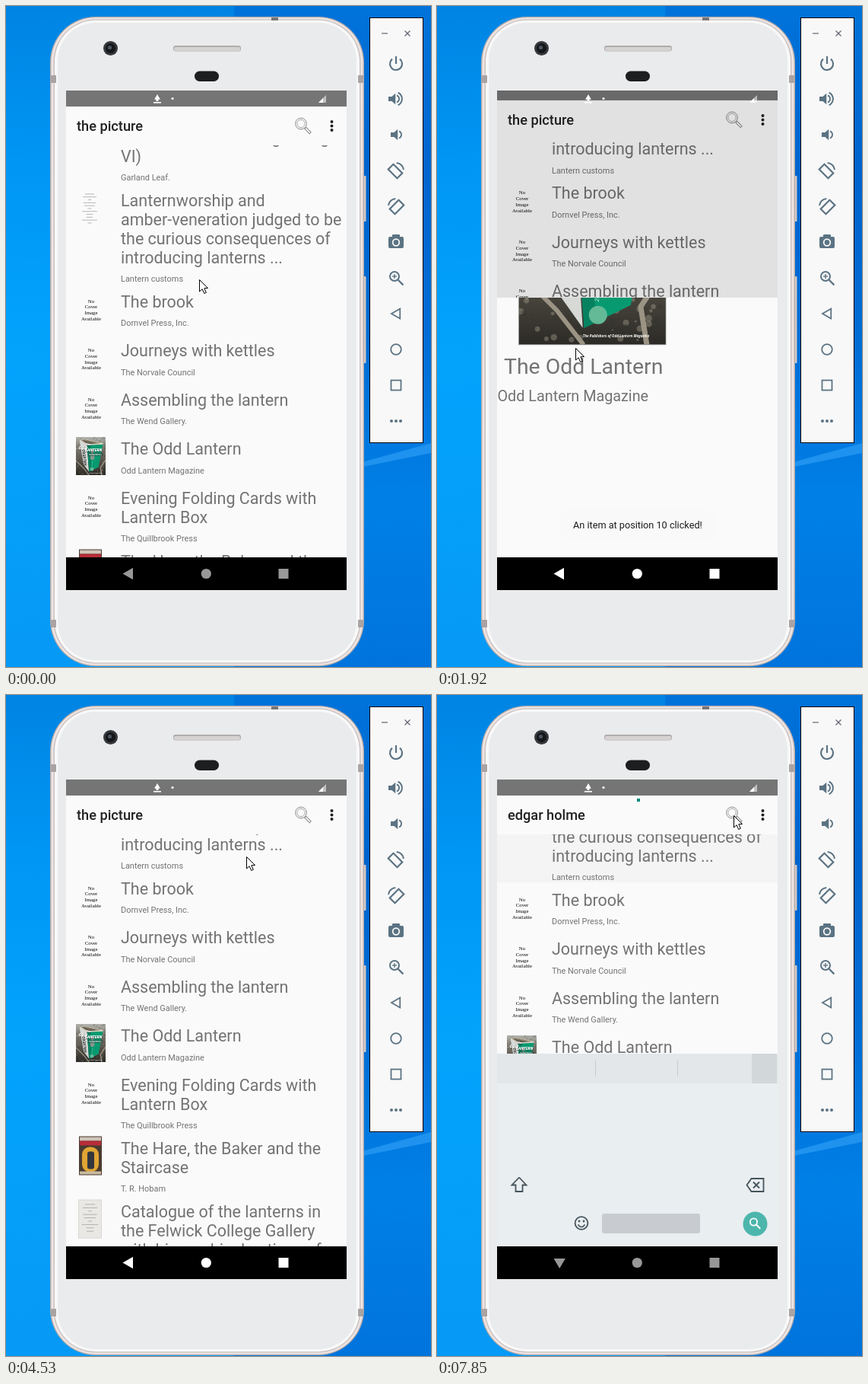
These frames come from a looping animation (559x868 px, 8 s). An HTML page with a canvas:

```html
<!DOCTYPE html>
<html lang="en">
<head>
<meta charset="utf-8">
<title>Book list app</title>
<style>
html, body { margin: 0; width: 100%; height: 100%; overflow: hidden; }
canvas { display: block; width: 559px; height: 868px; }
</style>
</head>
<body>
<canvas id="stage" width="559" height="868"></canvas>
<script>
const g = document.getElementById('stage').getContext('2d');
const LOOP = 8000;
const BURSTS = [[120, 940, 6], [1400, 1640, 2], [1790, 2070, 2], [2630, 3650, 7],
  [3800, 4220, 3], [4530, 5600, 8], [5890, 7150, 9], [7460, 7850, 3]];
const POINTER = [[120, 254, 359], [940, 182, 449], [2070, 182, 449], [2630, 170, 543],
  [3360, 160, 743], [4220, 160, 743], [4530, 316, 212], [4820, 390, 158]];
const GREY = '#737373', INK = '#212121', PAPER = '#fafafa', SLATE = '#5b7383', TEAL = '#00897b';
const SANS = 'Open Sans, sans-serif';
const BOOK = 'The Odd Lantern', MAKER = 'Odd Lantern Magazine', QUERY = 'edgar holme';

const items = [
  { lines: ['Tales of a hidden stage song', 'VI)'], by: 'Garland Leaf.' },
  { lines: ['Lanternworship and', 'amber-veneration judged to be', 'the curious consequences of', 'introducing lanterns ...'], by: 'Lantern customs', art: leaflet },
  { lines: ['The brook'], by: 'Dornvel Press, Inc.', art: noCover },
  { lines: ['Journeys with kettles'], by: 'The Norvale Council', art: noCover },
  { lines: ['Assembling the lantern'], by: 'The Wend Gallery.', art: noCover },
  { lines: [BOOK], by: MAKER, art: y => cover(92, y - 23, 39, 50) },
  { lines: ['Evening Folding Cards with', 'Lantern Box'], by: 'The Quillbrook Press', art: noCover },
  { lines: ['The Hare, the Baker and the', 'Staircase'], by: 'T. R. Hobam', art: novel },
  { lines: ['Catalogue of the lanterns in', 'the Felwick College Gallery', 'with biographical notices of'], by: 'Unknown', art: oldPage }
];
let rowY = 179.5;
for (const it of items) {
  it.y = rowY;
  rowY += Math.max(64.5, 33 + 25 * it.lines.length);
}

const ramp = (t, a, b) => Math.min(1, Math.max(0, (t - a) / (b - a)));
const mix = (a, b, k) => a + (b - a) * k;
const easeOut = k => 1 - (1 - k) ** 2;

function box(x, y, w, h, c) { g.fillStyle = c; g.fillRect(x, y, w, h); }
function frameBox(x, y, w, h, c, lw) { g.strokeStyle = c; g.lineWidth = lw; g.strokeRect(x, y, w, h); }
function rbox(x, y, w, h, r, c) { g.beginPath(); g.roundRect(x, y, w, h, r); g.fillStyle = c; g.fill(); }
function disc(x, y, r, c) { g.beginPath(); g.arc(x, y, r, 0, 7); g.fillStyle = c; g.fill(); }
function arc(x, y, r, a, b, c, lw) { g.beginPath(); g.arc(x, y, r, a, b); g.strokeStyle = c; g.lineWidth = lw; g.stroke(); }
function ring(x, y, r, c, lw) { arc(x, y, r, 0, 7, c, lw); }
function trace(p, close) {
  g.beginPath();
  for (let i = 0; i < p.length; i += 2) g.lineTo(p[i], p[i + 1]);
  if (close) g.closePath();
}
function poly(p, c) { trace(p, true); g.fillStyle = c; g.fill(); }
function line(p, c, lw, close) { trace(p, close); g.strokeStyle = c; g.lineWidth = lw; g.stroke(); }
// Corners of an equilateral triangle pointing towards angle a.
function tri(x, y, r, a) {
  return [0, 1, 2].flatMap(i => [x + r * Math.cos(a + i * 2.0944), y + r * Math.sin(a + i * 2.0944)]);
}
function cross(x, y, r, c, lw) {
  line([x - r, y - r, x + r, y + r], c, lw);
  line([x + r, y - r, x - r, y + r], c, lw);
}
function glass(x, y, r, c, lw) {
  ring(x, y, r, c, lw);
  line([x + r * 0.75, y + r * 0.75, x + r * 1.9, y + r * 1.9], c, lw * 1.15);
}
function text(s, x, y, size, c, style = '', family = 'Roboto, sans-serif') {
  g.font = `${style} ${size}px ${family}`;
  g.fillStyle = c;
  g.fillText(s, x, y);
}
function at(x, y, fn, angle = 0) { g.save(); g.translate(x, y); g.rotate(angle); fn(); g.restore(); }
function clip(x, y, w, h, fn) {
  g.save(); g.beginPath(); g.rect(x, y, w, h); g.clip(); fn(); g.restore();
}
function fade(a, fn) { g.save(); g.globalAlpha = a; fn(); g.restore(); }
function gradient(y0, y1, ...cs) {
  const f = g.createLinearGradient(0, y0, 0, y1);
  cs.forEach((c, i) => f.addColorStop(i / (cs.length - 1), c));
  return f;
}

function desktop() {
  box(0, 0, 300, 868, gradient(0, 868, '#0084e3', '#0097f4', '#02a2fb', '#049ff9', '#0699f5'));
  box(300, 0, 259, 868, gradient(0, 868, '#0073da', '#0064ce', '#006cd6', '#0080e6', '#0074dc'));
  poly([465, 600, 559, 574, 559, 587, 465, 606], 'rgba(70,175,255,.45)');
}

function phone() {
  for (const [y, h] of [[223, 60], [355, 114]]) rbox(470, y, 3.5, h, 1, '#d2c7c5');
  const shell = ['#b9aeac', '#eee5e3', '#c9c1c0', '#f8f8f9', '#e9ebed'];
  [0, 1.5, 4.5, 6, 10].forEach((d, i) => rbox(58 + d, 14 + d * 0.8, 413 - 2 * d, 853 - 1.6 * d, 60 - d, shell[i]));
  box(349, 15, 9, 4, '#77757a');
  for (const y of [91, 806]) for (const x of [59, 463]) box(x, y, 7, 10, '#aaa3a3');
  disc(137.5, 55.5, 9.5, '#35373b');
  disc(137.5, 55.5, 6.5, '#15171b');
  disc(136.5, 54.5, 2.6, '#4b5562');
  rbox(220, 52, 89, 7.5, 3, '#b1adad');
  rbox(221, 54, 87, 5, 2, '#d6d2d1');
  rbox(248, 85.5, 32, 13.5, 6.7, '#1d1e20');
}

function speaker(x, y, waves) {
  box(x - 7, y - 3, 5, 6, SLATE);
  poly(tri(x - 2, y, 8.5, Math.PI).map((v, i) => i === 0 ? x - 6 : v), SLATE);
  for (let i = 1; i <= waves; i++) arc(x + 2, y, 1 + i * 4, -1.15, 1.15, SLATE, 2);
}
function rotateIcon(y, dir) {
  at(513, y, () => {
    g.scale(dir, 1);
    at(-1, 1, () => frameBox(-4.8, -8.3, 9.6, 16.6, SLATE, 2.2), -Math.PI / 4);
    arc(0, 0, 10, -1.5, -0.1, SLATE, 2);
  });
}
function sidebar() {
  box(478, 15, 71, 559, '#000');
  box(479, 16, 69, 557, '#f8f8f8');
  line([494, 36, 502, 36], '#667', 1.2);
  cross(528, 36, 3.5, '#667', 1.2);
  arc(513, 76, 8, -0.9, Math.PI + 0.9, SLATE, 2.2);
  line([513, 66, 513, 76], SLATE, 2.2);
  speaker(510, 122, 2);
  speaker(513, 169, 1);
  rotateIcon(216, 1);
  rotateIcon(263, -1);
  rbox(503, 303, 20, 15, 2, SLATE);
  rbox(508, 300, 10, 6, 1, SLATE);
  ring(513, 310.5, 4.3, '#f8f8f8', 1.8);
  glass(511, 355, 6, SLATE, 2);
  at(511, 355, () => cross(0, 0, 2.1, SLATE, 1.4), Math.PI / 4);
  line(tri(514.5, 404, 7.5, Math.PI), SLATE, 1.8, true);
  ring(513, 451, 6.8, SLATE, 1.8);
  frameBox(506.5, 491.5, 13, 13, SLATE, 1.8);
  for (let x = 507; x < 520; x += 6) disc(x, 545, 2, SLATE);
}

function noCover(y) {
  g.textAlign = 'center';
  'No Cover Image Available'.split(' ').forEach((s, i) =>
    text(s, 112, y - 6 + i * 7.8, 6.8, '#000', '', 'Liberation Serif, serif'));
  g.textAlign = 'left';
}
// Rows of unreadable print, centred on x.
function print(x, y, rows, gap, width, c) {
  for (let i = 0; i < rows; i++) {
    const w = width * (0.6 + 0.4 * Math.sin(i * 2.3));
    box(x - w / 2, y + i * gap, w, 0.9, c);
  }
}
function leaflet(y) { print(110, y - 16, 11, 3.8, 20, '#b0b0b0'); }
function oldPage(y) {
  box(95, y - 23, 31, 51, '#d8d7d3');
  box(96, y - 22, 29, 49, '#e9e8e4');
  print(110.5, y - 17, 9, 4.4, 22, '#adaca8');
}
function novel(y) {
  box(96, y - 23, 30, 51, '#493b30');
  box(97, y - 22, 28, 5, '#cfc4b8');
  box(97, y - 17, 28, 6, '#b62d38');
  rbox(100, y - 9, 22, 33, 10, '#e0a534');
  rbox(107, y - 3, 9, 23, 3, '#33363d');
  box(97, y + 23, 28, 4, '#c9b9a0');
}

// Book cover on a 193 x 250 grid: a tower block seen from the air.
function cover(x, y, w, h) {
  g.save();
  g.translate(x, y);
  g.scale(w / 193, h / 250);
  g.beginPath(); g.rect(0, 0, 193, 250); g.clip();
  box(0, 0, 193, 250, gradient(0, 250, '#b4b5b0', '#7e7b70', '#67625a', '#48453d', '#2c2a26'));
  let seed = 7;
  const rnd = () => (seed = seed * 16807 % 2147483647) / 2147483647;
  for (let i = 0; i < 260; i++) {
    const px = rnd() * 193, py = rnd() * 250;
    fade(0.4, () => disc(px, py, 1 + rnd() * 3.5, rnd() < 0.65 ? '#33352e' : '#a8a292'));
  }
  line([0, 155, 50, 205, 85, 250], '#9b9383', 6);
  line([193, 150, 160, 200, 168, 250], '#9b9383', 7);
  poly([23, 20, 72, 50, 84, 228, 50, 180], '#d6d9d6');
  poly([72, 50, 176, 45, 147, 198, 86, 228], '#079a70');
  poly([72, 50, 95, 49, 101, 221, 86, 228], '#068260');
  poly([23, 20, 55, 13, 176, 40, 176, 49, 74, 54], '#d9d2c1');
  poly([34, 20, 57, 16, 160, 40, 77, 47], '#665f50');
  for (let i = 0; i < 11; i++) line([44 + i * 10, 21 + i * 2, 54 + i * 10, 18 + i * 2.2], '#c0b296', 3);
  at(70, 187, () => text('HALVEXO', 0, 0, 25, '#2d312f', 'italic 700', SANS), -1.68);
  for (let i = 0; i < 2; i++) {
    g.beginPath(); g.ellipse(107, 92 + i * 40, 11 + i * 3, 15 + i * 4, 0.1, 0, 7);
    g.fillStyle = '#84968d'; g.fill();
  }
  disc(104, 211, 12, '#64b997');
  at(105, 194, () => text('24 novalin', 0, 0, 8, '#c9e8dc', 'italic'), -1.42);
  fade(0.55, () => box(80, 105, 96, 20, '#24483c'));
  const bold = (s, px, py, size) => {
    text(s, px + 1.5, py + 1.5, size, 'rgba(0,0,0,.55)', 'italic 800', SANS);
    text(s, px, py, size, '#fff', 'italic 800', SANS);
  };
  box(0, 78, 62, 1.2, '#fff');
  bold('The', 65, 56, 18);
  bold('ODD', 17, 78, 28);
  bold('LANTERN', 61, 97, 24);
  const small = (s, py, size) => text(s, 84, py, size, '#fff', 'italic 700', SANS);
  small('The Craft & Trimming of', 113, 6.7);
  small('Large-Format Paper Lights', 121, 6.7);
  small('The Publishers of ' + MAKER, 240, 4.6);
  g.restore();
}

function statusIcons() {
  poly(tri(199, 120.5, 4.5, -Math.PI / 2), '#fff');
  box(197.5, 121, 3, 4, '#fff');
  box(194, 126, 10, 1.6, '#fff');
  disc(219, 121.5, 1.6, '#fff');
  poly([421, 117, 421, 127, 411, 127], 'rgba(255,255,255,.55)');
  poly([417, 121, 417, 127, 411, 127], '#fff');
}
function menuDots() { for (let y = 152; y < 164; y += 5.5) disc(428.5, y, 2, INK); }
function lens() {
  ring(388, 154.5, 7.4, '#8b8b8b', 1);
  ring(388, 154.5, 5.2, '#9c9c9c', 0.9);
  at(397, 163.5, () => frameBox(-4.5, -1.4, 9, 2.8, '#8b8b8b', 1), Math.PI / 4);
}

function listScreen(s) {
  box(79, 132, 369, 592, PAPER);
  clip(79, 183, 369, 541, () => {
    if (s.loading) box(79, 183, 369, 63, '#f4f4f4');
    for (const it of items) {
      const y = it.y - s.scroll, last = y + (it.lines.length - 1) * 25;
      if (it.art) it.art(y);
      it.lines.forEach((l, i) => text(l, 151, y + i * 25, 21.5, GREY));
      text(it.by, 151, last + 24.5, 10.95, GREY);
    }
  });
  if (s.search) {
    box(92, 146, 309, 23, '#f5f5f5');
    line([111, 157.5, 98, 157.5], INK, 1.9);
    line([104, 151, 97.5, 157.5, 104, 164], INK, 1.9);
    text(s.typed || 'Search…', 144, 164, 16, s.typed ? INK : '#8a8a8a');
    box(143.5 + (s.typed && g.measureText(s.typed).width), 147, 1.6, 21, TEAL);
  } else {
    text(s.title, 93, 164, 18.2, INK, '500');
    lens();
  }
  menuDots();
  if (s.loading) box(263, 136, 4, 4, TEAL);
}

function detailScreen() {
  box(79, 132, 369, 592, PAPER);
  text(BOOK, 94, 165, 18.1, INK, '500');
  for (const y of [141.5, 173.5]) line([311, y, 412, y], '#d2d2d2', 1);
  line([311.5, 141, 311.5, 174], '#e4e4e4', 1);
  line([361.5, 148, 361.5, 168], '#dedede', 1);
  const nodes = [344, 149.5, 329.5, 157.5, 344, 165.5];
  line(nodes, INK, 2);
  for (let i = 0; i < 6; i += 2) disc(nodes[i], nodes[i + 1], 3.7, INK);
  disc(386.5, 157.5, 11, '#4285f4');
  menuDots();
  cover(107.5, 190.5, 193.5, 250.5);
  frameBox(107.5, 190.5, 193.5, 250.5, '#8a8a8a', 0.7);
  text(BOOK, 88, 479, 28.4, GREY);
  text(MAKER, 79.5, 515, 19.8, GREY);
}

function keyboard() {
  const c = '#46545c';
  box(79, 471, 369, 253, '#e9eef1');
  box(79, 471, 369, 39, '#e3e7e9');
  box(414, 471, 33, 39, '#d2d7d9');
  for (const x of [208, 316]) box(x, 480, 1, 21, '#c5cacd');
  at(108, 643.5, () => {
    for (const side of [-1, 1]) line([0, -10, 9.5 * side, 0, 4.5 * side, 0, 4.5 * side, 8.5, 0, 8.5], c, 1.8);
  });
  line([407.5, 643.5, 413.5, 635, 429.5, 635, 429.5, 652, 413.5, 652], c, 1.8, true);
  cross(420, 643.5, 4, c, 1.8);
  ring(190, 693.5, 8.4, c, 1.8);
  for (const x of [187, 193]) disc(x, 691, 1.4, c);
  arc(190, 694, 4.5, 0.3, 2.84, c, 1.6);
  rbox(217, 681, 129, 26, 3, '#c8ccd0');
  disc(418.5, 694.5, 16, '#4db6ac');
  glass(416.5, 692, 4.6, '#fff', 1.8);
}

function navBar(s) {
  box(79, 724, 369, 43, '#000');
  fade(s.press, () => rbox(116, 725, 90, 42, 21, '#232323'));
  const c = s.dim ? '#989898' : '#fff';
  poly(s.keys < 100 ? tri(161.2, 744.3, 8.8, Math.PI / 2) : tri(162.5, 745.5, 9, Math.PI), c);
  disc(263.3, 745.5, 6.6, c);
  box(358.5, 739, 13, 13, c);
}

function pointer(t) {
  const i = POINTER.findLastIndex(p => p[0] <= t);
  const a = POINTER[Math.max(i, 0)], b = POINTER[Math.min(i + 1, POINTER.length - 1)];
  const k = ramp(t, a[0], b[0]) || 0;
  at(mix(a[1], b[1], k) + 0.5, mix(a[2], b[2], k) + 0.5, () => {
    const arrow = [0, 0, 0, 15.5, 3.6, 12.2, 6.2, 18, 8.8, 16.8, 6.3, 11.2, 11, 11];
    poly(arrow, '#fff');
    line(arrow, '#000', 1, true);
  });
}

function stateAt(t) {
  const closed = easeOut(ramp(t, 3621, 4080));
  return {
    scroll: 134 * easeOut(ramp(t, 0, 940)) - 15 * ramp(t, 7590, 7850),
    // How far the detail page covers the list, 0 to 1.
    page: easeOut(ramp(t, 1640, 2070)) - closed,
    scrim: 0.14 * (easeOut(ramp(t, 1540, 2070)) - closed),
    entering: t >= 1640 && t < 1790,
    toast: ramp(t, 1400, 1640) - ramp(t, 3220, 3510),
    press: ramp(t, 3360, 3510) - ramp(t, 3800, 4220),
    dim: t < 1400 || (t > 1920 && t < 3360) || t > 6300,
    search: t > 5060 && t < 7580,
    loading: t > 7700,
    title: t < 7580 ? 'the picture' : QUERY,
    keys: 253 * (1 - easeOut(ramp(t, 5220, 5600))),
    typed: QUERY.slice(0, Math.floor(11 * ramp(t, 5890, 7460)))
  };
}

function draw(t) {
  const s = stateAt(t);
  desktop();
  phone();
  sidebar();
  clip(79, 111, 369, 656, () => {
    box(79, 111, 369, 21, '#757575');
    box(79, 132, 369, 592, PAPER);
    at(0, -14 * s.page, () => listScreen(s));
    box(79, 111, 369, 613, `rgba(0,0,0,${s.scrim})`);
    if (s.page > 0) {
      const cut = mix(724, 132, s.page);
      clip(79, cut, 369, 724 - cut, () => at(0, 9 * (1 - s.page), detailScreen));
      if (s.page === 1) box(79, 111, 369, 21, '#757575');
    }
    statusIcons();
    if (s.keys < 253) clip(79, 471, 369, 253, () => at(0, s.keys, keyboard));
    navBar(s);
    if (s.entering) box(79, 733, 369, 18, '#f3f3f3');
    fade(s.toast * 0.85, () => rbox(159, 660, 211, 42, 21, s.page ? PAPER : '#eee'));
    fade(s.toast, () => text('An item at position 10 clicked!', 179, 685.5, 12.7, '#1c1c1c'));
  });
  pointer(t);
}

// Time of the latest screen update.
function updateTime(t) {
  const b = BURSTS.findLast(b => b[0] <= t);
  if (!b) return 0;
  const [start, end, n] = b;
  return mix(start, end, Math.floor(n * ramp(t, start, end) + 1e-6) / n);
}

function frame(now) {
  draw(updateTime(now % LOOP));
  requestAnimationFrame(frame);
}
draw(0);
requestAnimationFrame(frame);
</script>
</body>
</html>
```
